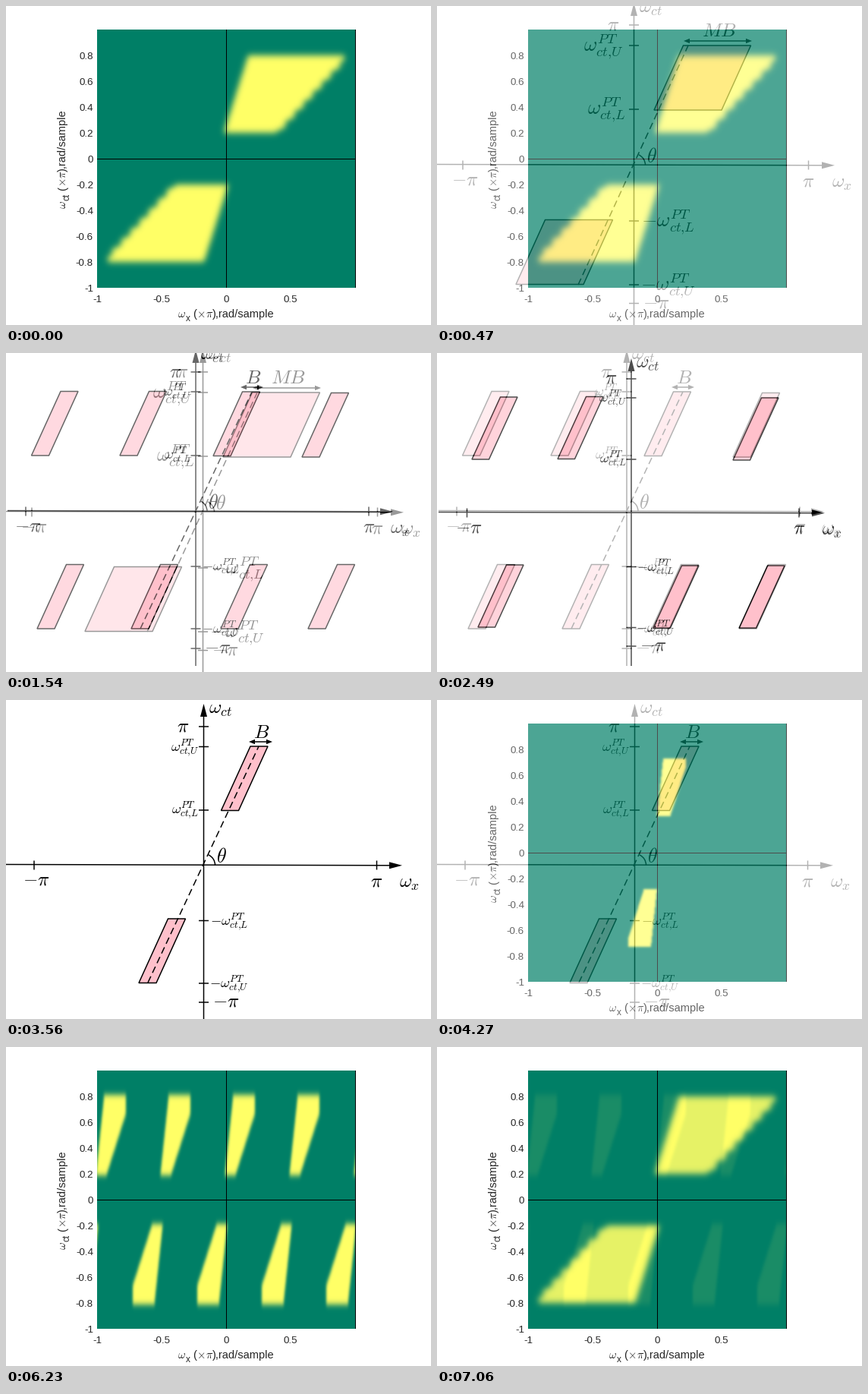
A matplotlib script that plays this animation: 560 px wide and 420 px high, repeating every 7120 ms.

```python
import numpy as np
import matplotlib.pyplot as plt
from matplotlib.animation import FuncAnimation
from matplotlib.patches import Arc, Polygon

W, H = 560, 420
STEP, HOLD, FADE, CYCLE = 10, 350, 60, 890   # ms
PT = 0.72                                    # points per pixel at 100 dpi
PINK = "#ffc0cb"

plt.rcParams["font.family"] = "Liberation Sans"
plt.rcParams["mathtext.fontset"] = "cm"
fig = plt.figure(figsize=(W / 100, H / 100), dpi=100, facecolor="white")


# ---------- drawing helpers (pixel coordinates, y down) ----------

def stage():
    fig.clf()
    ax = fig.add_axes([0, 0, 1, 1])
    ax.axis("off")
    return ax


def snapshot(ax):
    ax.set_xlim(0, W)
    ax.set_ylim(H, 0)
    fig.canvas.draw()
    return np.asarray(fig.canvas.buffer_rgba())[..., :3].astype(float)


def line(ax, x, y, lw=1.5, **kw):
    ax.plot(x, y, color="black", lw=lw * PT, solid_capstyle="butt", snap=False, **kw)


def text(ax, x, y, s, px, ha="center", va="center", **kw):
    ax.text(x, y, s, fontsize=px * PT, ha=ha, va=va, **kw)


def head(ax, x, y, dx, dy, length=17, half=4.5):
    """Filled arrow head with its tip at (x, y), pointing along (dx, dy)."""
    bx, by = x - dx * length, y - dy * length
    ax.add_patch(Polygon([(x, y), (bx - dy * half, by + dx * half),
                          (bx + dy * half, by - dx * half)],
                         fc="black", ec="none", zorder=4))


# ---------- spectrum maps ----------

PAD = 30
X, Y = np.meshgrid(np.arange(90.5, 490), np.arange(1.5, 401))


def blur(m, sx, sy):
    for axis, s in ((1, sx), (0, sy)):
        r = np.arange(-15, 16)
        k = np.exp(-0.5 * (r / s) ** 2)
        k /= k.sum()
        m = np.apply_along_axis(np.convolve, axis, m, k, "same")
    return m


def both(m):
    """Add the copy turned by half a turn about the origin."""
    return np.clip(m + m[::-1, ::-1], 0, 1)


def wide_map():
    left = 287 + (167 - Y) * 32 / 102
    right = 358 + (167 - Y) * 94 / 102 + 3 * np.sin(2 * np.pi * Y / 13)
    m = (X > left) & (X < np.minimum(right, 446)) & (Y > 65) & (Y < 167)
    return both(blur(m.astype(float), 4, 4.4))


def strip(shift, top, bottom):
    x = X - shift
    left = 298 - (Y - 77) * 8 / 76
    right = np.minimum(328, 328 - (Y - 88) * 20 / 63)
    return ((x > left) & (x < right) & (Y > top) & (Y < bottom)).astype(float)


def narrow_map():
    return both(blur(strip(0, 77, 153), 1.5, 1.5))


def all_map():
    m = sum(strip(85 * n, 63, 169) for n in range(-2, 3))
    return both(blur(m, 1.6, 4))


def ripple(m):
    wave = np.cos(2 * np.pi * (X + Y * 0.12) / 8.5)
    rows = sum(np.exp(-((Y - c) / 5) ** 2) for c in (75, 135, 267, 327))
    return np.clip(m * (0.97 + 0.04 * wave) + 0.02 * rows * (1 + wave) * (1 - m), 0, 1)


def axis_label(ax, x, y, sub, sub_w, turned=False):
    size = 14.67
    a = 11 + sub_w + 3.5
    parts = [(0, 0, r"$\omega$", size), (10.5, 5, sub, 11.7),
             (a, 0, "(", size), (a + 5, 0, r"$\times$", size),
             (a + 16.5, 0, r"$\pi$", size), (a + 25.5, 0, "),rad/sample", size)]
    for along, drop, s, px in parts:
        px_x, px_y = (x + drop, y - along) if turned else (x + along, y + drop)
        text(ax, px_x, px_y, s, px, ha="left", va="baseline", color="#262626",
             rotation=90 if turned else 0, rotation_mode="anchor")


def spectrum(values):
    ax = stage()
    ax.imshow(values[PAD:-PAD, PAD:-PAD], cmap="summer", vmin=0, vmax=1,
              extent=(120, 460, 371, 31), aspect="auto", interpolation="nearest")
    for x in (290.5, 460.5):
        line(ax, [x, x], [31, 371], 1)
    line(ax, [120, 461], [201.5, 201.5], 1)
    for n in range(-5, 5):
        text(ax, 115, 206.5 - 34 * n, "%g" % (n / 5), 13.33,
             ha="right", va="baseline", color="#262626")
    for n in range(-2, 2):
        text(ax, 290 + 85 * n, 390, "%g" % (n / 2), 13.33, va="baseline", color="#262626")
    axis_label(ax, 226, 410, "x", 5.8)
    axis_label(ax, 79, 267, "ct", 9.1, turned=True)
    return snapshot(ax)


# ---------- schematic diagrams ----------

def omega(edge, sign=""):
    return r"$%s\omega_{ct{,}%s}^{PT}$" % (sign, edge)


def diagram(ox, oy, tip_x, tip_y, xticks, yticks, bands, shape, small=18.5,
            label_dx=(-24.5, -24.5, 33.5), start=0, end=420, dash=None, span=None, name="B"):
    ax = stage()
    line(ax, [start, tip_x - 10], [oy - 1, oy + 0.3])
    line(ax, [ox, ox], [tip_y + 10, end])
    head(ax, tip_x, oy + 0.3, 1, 0)
    head(ax, ox, tip_y, 0, -1)
    for x in xticks:
        line(ax, [x, x], [oy - 6, oy + 6])
    for y in yticks:
        line(ax, [ox - 6.5, ox + 6.5], [y, y])

    big = 25
    text(ax, xticks[0] + 2.5, oy + 26, r"$-\pi$", big, va="baseline")
    text(ax, xticks[1], oy + 27.5, r"$\pi$", big, va="baseline")
    text(ax, tip_x + 9.5, oy + 23.5, r"$\omega_x$", big)
    text(ax, ox + 21.5, tip_y + 6.5, r"$\omega_{ct}$", big, clip_on=True)
    up, low, right = label_dx
    text(ax, ox - 27, yticks[0] + 6, r"$\pi$", big, va="baseline")
    text(ax, ox + up, yticks[1] + 1.5, omega("U"), small)
    text(ax, ox + low, yticks[2] + 0.5, omega("L"), small)
    text(ax, ox + right, yticks[3] + 1.5, omega("L", "-"), small)
    text(ax, ox + right, yticks[4] + 1.5, omega("U", "-"), small)
    text(ax, ox + 29, yticks[5] + 5.5, r"$-\pi$", big, va="baseline")

    lean, width, height = shape
    for x, y in bands:
        ax.add_patch(Polygon([(x, y), (x + lean, y - height),
                              (x + lean + width, y - height), (x + width, y)],
                             fc=PINK, ec="black", lw=1.5 * PT, zorder=1))
    if dash:
        line(ax, *dash, dashes=(6, 3.4), zorder=3)
        ax.add_patch(Arc((ox, oy), 30, 30, theta1=-65, theta2=0,
                         lw=1.5 * PT, color="black"))
        text(ax, ox + 23, oy - 3.5, r"$\theta$", 26, va="baseline")
    if span:
        x1, x2, y = span
        line(ax, [x1 + 4, x2 - 4], [y, y])
        head(ax, x1, y, -1, 0, 8, 3.2)
        head(ax, x2, y, 1, 0, 8, 3.2)
        text(ax, (x1 + x2) / 2 + 1.5, y - 5.5, "$%s$" % name, 25.5, va="baseline")
    return snapshot(ax)


wide_diagram = dict(
    ox=259.5, oy=209.5, tip_x=524, tip_y=-4, xticks=(34, 489.5),
    yticks=(25, 52, 136, 283, 367, 391.5), bands=[(286, 137), (104, 366.5)],
    shape=(38.5, 89, 85), small=26.5, label_dx=(-40, -36, 45),
    dash=([186, 331], [367, 52]), span=(325, 415, 46), name="MB")

copies_diagram = dict(
    ox=250, oy=208.5, tip_x=510, tip_y=-4, xticks=(26, 478),
    yticks=(25, 51, 135, 281, 363, 389),
    bands=[(33.5, 135), (150, 135), (273, 135.5), (390, 137),
           (41, 363), (165, 363), (283, 363), (398, 363)],
    shape=(38.5, 23, 84.5), start=2, end=412,
    dash=([177, 324], [363, 51]), span=(309, 339, 45))

outer_diagram = dict(
    ox=256, oy=210.5, tip_x=511, tip_y=7, xticks=(39.5, 477),
    yticks=(34, 59, 140, 281.5, 361.5, 386),
    bands=[(46, 140), (159, 139.5), (390, 141), (54, 361), (285, 362), (398, 362)],
    shape=(37.5, 22.5, 82), start=2, end=412, label_dx=(-24, -24, 32))

single_diagram = dict(
    ox=260.5, oy=217.5, tip_x=522, tip_y=5, xticks=(37, 488.5),
    yticks=(35, 61.5, 145, 290.5, 373, 398), bands=[(283.5, 145.5), (175, 372.5)],
    shape=(38.5, 23, 84.5), dash=([187, 333], [372, 61]), span=(320, 351, 55))

narrow, copies = narrow_map(), all_map()
slides = [
    spectrum(wide_map()),
    diagram(**wide_diagram),
    diagram(**copies_diagram),
    diagram(**outer_diagram),
    diagram(**single_diagram),
    spectrum(narrow),
    spectrum(ripple(np.clip(copies - narrow, 0, 1))),
    spectrum(copies),
]


# ---------- animation: hold each slide, then cross-fade in tenths ----------

fig.clf()
picture = fig.figimage(slides[0].astype(np.uint8))


def update(i):
    n, t = divmod(i * STEP, CYCLE)
    k = 0 if t < HOLD else (t - HOLD) // FADE + 1
    a, b = slides[n], slides[(n + 1) % len(slides)]
    picture.set_data(np.rint(a + (b - a) * k / 10).astype(np.uint8))
    return [picture]


anim = FuncAnimation(fig, update, frames=len(slides) * CYCLE // STEP,
                     interval=STEP, repeat=True, repeat_delay=0)
plt.show()
```
